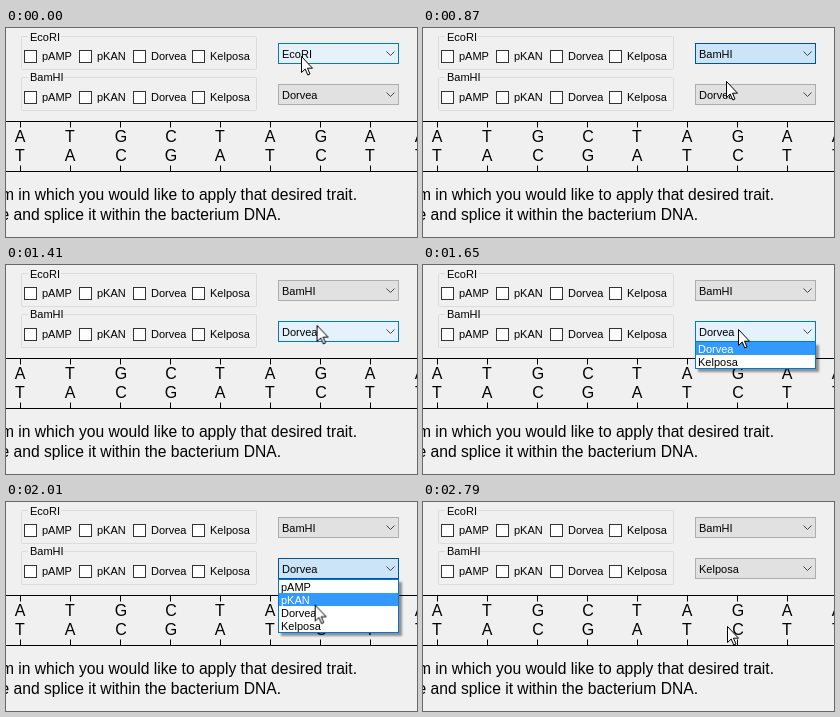
Recreate the animation shown at these times as an HTML page. Size 411 by 209 pixels, loop 2940 ms.

```html
<!DOCTYPE html>
<html lang="en">
<head>
<meta charset="utf-8">
<title>Restriction enzyme picker</title>
<style>
html, body { margin: 0; width: 100%; height: 100%; overflow: hidden; background: #f0f0f0; }
body { position: relative; font: 11px "Liberation Sans", Arial, sans-serif; color: #000; }
svg { position: absolute; left: 0; top: 0; overflow: visible; }
.big { font-size: 15.63px; }
.dna { font-size: 16px; text-anchor: middle; }

.combo, .drop, .list { position: absolute; box-sizing: border-box; }
.combo {
  left: 272px; width: 121px; height: 21px;
  border: 1px solid #adadad; background: #e1e1e1; line-height: 20px;
}
.combo span { position: absolute; left: 3px; }
.combo svg { left: 107px; top: 7px; }
.drop { left: 272px; width: 121px; overflow: hidden; box-shadow: 3px 3px 2px rgba(0, 0, 0, .4); }
.list { left: 0; bottom: 0; width: 100%; border: 1px solid #0078d7; background: #fff; }
.list div { height: 13px; line-height: 14px; padding-left: 2px; }

.combo, .drop, #cursor { animation: 2940ms linear infinite; }
.combo span, .list div { animation: 2940ms step-end infinite; }

#enzyme { top: 15px; animation-name: enzyme; }
#gene { top: 56px; animation-name: gene; }
#enzymes { top: 35px; animation-name: enzymes; }
#genes { top: 77px; animation-name: genes; }
#cursor { animation-name: move; }
#enzyme .old { animation-name: enzyme-old; }
#enzyme .new { animation-name: enzyme-new; }
#gene .old { animation-name: gene-old; }
#gene .new { animation-name: gene-new; }
#eco { animation-name: eco; }
#bam { animation-name: bam; }
#amp { animation-name: amp; }
#kan { animation-name: kan; }
#dor { animation-name: dor; }
#kel { animation-name: kel; }

@keyframes move {
  0%, 18.37% { transform: translate(295px, 28px); }
  22.45%, 41.3% { transform: translate(303px, 53px); }
  52%, 58.16% { transform: translate(315px, 64px); }
  63.27% { transform: translate(312px, 87px); }
  75.51%, 100% { transform: translate(304px, 124px); }
}

/* button fades: hover, pressed, idle */
@keyframes enzyme {
  0%, 13.27% { background: #e5f1fb; border-color: #0078d7; }
  16%, 41% { background: #cce4f7; border-color: #005499; }
  47%, 100% { background: #e1e1e1; border-color: #adadad; }
}
@keyframes gene {
  0%, 43.5% { background: #e1e1e1; border-color: #adadad; }
  47%, 56.2% { background: #e5f1fb; border-color: #0078d7; }
  59%, 86.73% { background: #cce4f7; border-color: #005499; }
  93.9%, 100% { background: #e1e1e1; border-color: #adadad; }
}

/* lists slide out from under their button */
@keyframes enzymes {
  0%, 13.26% { height: 0; visibility: hidden; }
  13.27% { height: 0; visibility: visible; }
  17.3%, 29.58% { height: 28px; visibility: visible; }
  29.59%, 100% { height: 28px; visibility: hidden; }
}
@keyframes genes {
  0%, 54.07% { height: 0; visibility: hidden; }
  54.08% { height: 0; visibility: visible; }
  58.16%, 86.72% { height: 54px; visibility: visible; }
  86.73%, 100% { height: 54px; visibility: hidden; }
}

@keyframes enzyme-old { 0% { opacity: 1; } 29.59%, 100% { opacity: 0; } }
@keyframes enzyme-new { 0% { opacity: 0; } 29.59%, 100% { opacity: 1; } }
@keyframes gene-old { 0% { opacity: 1; } 86.73%, 100% { opacity: 0; } }
@keyframes gene-new { 0% { opacity: 0; } 86.73%, 100% { opacity: 1; } }

/* highlighted row follows the pointer */
@keyframes eco {
  0% { background: #39f; color: #fff; }
  21.94%, 100% { background: #fff; color: #000; }
}
@keyframes bam {
  0% { background: #fff; color: #000; }
  21.94%, 100% { background: #39f; color: #fff; }
}
@keyframes amp {
  0%, 64.59%, 100% { background: #fff; color: #000; }
  61.26% { background: #39f; color: #fff; }
}
@keyframes kan {
  0%, 68.9%, 100% { background: #fff; color: #000; }
  64.59% { background: #39f; color: #fff; }
}
@keyframes dor {
  0%, 68.9% { background: #39f; color: #fff; }
  61.26%, 73.2%, 100% { background: #fff; color: #000; }
}
@keyframes kel {
  0% { background: #fff; color: #000; }
  73.2%, 100% { background: #39f; color: #fff; }
}
</style>
</head>
<body>
<svg width="411" height="209">
  <defs>
    <rect id="box" x=".5" y=".5" width="12" height="12" fill="#fff" stroke="#333"/>
    <g id="row">
      <rect x="15.5" y="8.5" width="235" height="33" rx="1" fill="none" stroke="#dcdcdc"/>
      <use href="#box" x="18" y="22"/><text x="36" y="32">pAMP</text>
      <use href="#box" x="73" y="22"/><text x="91" y="32">pKAN</text>
      <use href="#box" x="127" y="22"/><text x="145" y="32">Dorvea</text>
      <use href="#box" x="186" y="22"/><text x="204" y="32">Kelposa</text>
    </g>
  </defs>
  <use href="#row"/>
  <use href="#row" y="41"/>
  <path d="M22 4h33v9H22zM22 45h35v9H22z" fill="#f0f0f0"/>
  <text x="24" y="13">EcoRI</text>
  <text x="24" y="53">BamHI</text>

  <path d="M0 93.5H411M0 143.5H411" stroke="#000"/>
  <path d="M14 96.5H411M14 140.5H411" stroke="#000" stroke-width="6" stroke-dasharray="1 49"/>
  <g class="dna">
    <text y="114" x="14 64 115 165 214 264 315 364 414">ATGCTAGAA</text>
    <text y="133" x="14 64 115 165 214 264 315 364 414">TACGATCTT</text>
  </g>
  <g class="big" text-anchor="end">
    <text x="351" y="172">m in which you would like to apply that desired trait.</text>
    <text x="275" y="192">e and splice it within the bacterium DNA.</text>
  </g>
</svg>

<div class="combo" id="enzyme">
  <span class="old">EcoRI</span><span class="new">BamHI</span>
  <svg width="9" height="6"><path d="M.5 .5l4 4l4-4" fill="none" stroke="#444"/></svg>
</div>
<div class="combo" id="gene">
  <span class="old">Dorvea</span><span class="new">Kelposa</span>
  <svg width="9" height="6"><path d="M.5 .5l4 4l4-4" fill="none" stroke="#444"/></svg>
</div>

<div class="drop" id="enzymes"><div class="list">
  <div id="eco">EcoRI</div>
  <div id="bam">BamHI</div>
</div></div>
<div class="drop" id="genes"><div class="list">
  <div id="amp">pAMP</div>
  <div id="kan">pKAN</div>
  <div id="dor">Dorvea</div>
  <div id="kel">Kelposa</div>
</div></div>

<svg id="cursor" width="13" height="21">
  <path d="M.5 .5V16.5L4.2 13L6.8 19L9 18L6.5 12.2H11.5Z" fill="#fff" stroke="#000"/>
</svg>
</body>
</html>
```
